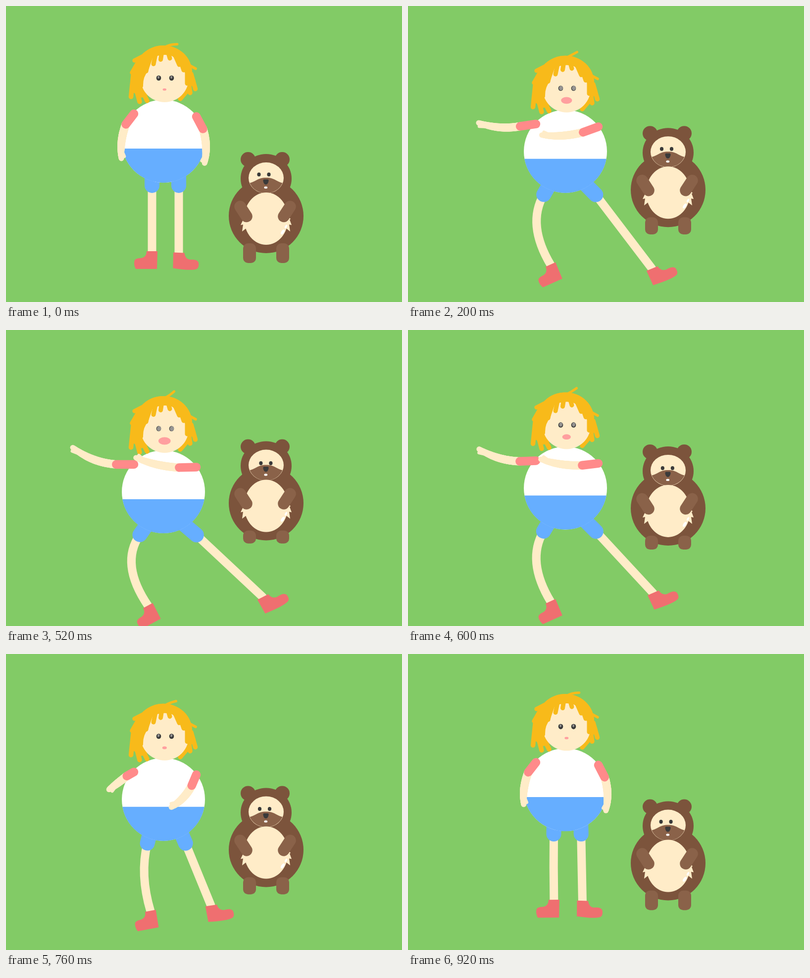
These frames come from a looping animation (800 by 600 pixels, 960 ms). An HTML page with a canvas:

```html
<!DOCTYPE html>
<html lang="en">
<head>
<meta charset="utf-8">
<title>Girl and bear dancing</title>
<style>
html, body { margin: 0; width: 100%; height: 100%; overflow: hidden; background: #82cb66; }
canvas { display: block; }
</style>
</head>
<body>
<canvas id="stage" width="800" height="600"></canvas>
<script>
const ctx = document.getElementById('stage').getContext('2d');
const LOOP = 960, STEP = 40, HALF = LOOP / 2;
const GREEN = '#82cb66', SKIN = '#ffecc8', HAIR = '#f8ba1a', BLUE = '#66aeff', SLEEVE = '#ff8a8a',
  SHOE = '#ef6f70', LIPS = '#ff9f9f', DARK = '#3a3a3a', GLINT = '#969492', FUR = '#7c543c', PAW = '#8a6249';

const mix = (a, b, k) => a + (b - a) * k;
const smooth = k => k * k * (3 - 2 * k);

function fill(color, path) {
  ctx.fillStyle = color;
  ctx.fill(new Path2D(path));
}
function ellipse(color, x, y, rx, ry = rx, turn = 0) {
  ctx.fillStyle = color;
  ctx.beginPath();
  ctx.ellipse(x, y, rx, ry, turn, 0, 7);
  ctx.fill();
}
function stroke(color, width, path, cap = 'round') {
  ctx.strokeStyle = color;
  ctx.lineWidth = width;
  ctx.lineCap = cap;
  ctx.stroke(new Path2D(path));
}
const line = (color, width, from, to) => stroke(color, width, `M${from}L${to}`);
function placed([x, y], draw, turn = 0, stretch = 1) {
  ctx.save();
  ctx.translate(x, y);
  ctx.rotate(turn * Math.PI / 180);
  ctx.scale(stretch, 1);
  draw();
  ctx.restore();
}

// Each arm swings around its shoulder; its reach shortens by "fold" on the way.
const LEFT_ARM = {
  x: 258.5, y: 218.5, side: 1, bulge: [-8, 15],
  sleeve: { length: [27, 36], fold: 14, angle: [127.5, 180] },
  hand: { length: [94, 129], fold: 46, angle: [105.7, 195.5] }
};
const RIGHT_ARM = {
  x: 384.5, y: 224, side: -1, bulge: [-9, -8],
  sleeve: { length: [28.4, 34.8], fold: 7, angle: [62, 178.5] },
  hand: { length: [96, 124], fold: 24, angle: [80, 189] }
};
function arm({ x, y, side, bulge, sleeve, hand }, swing, bend) {
  const folded = 6.75 * swing * (1 - swing) ** 2;
  const reach = ({ length, fold, angle }) => {
    const r = mix(...length, swing) - fold * folded, a = mix(...angle, bend) * Math.PI / 180;
    return [x + r * Math.cos(a), y + r * Math.sin(a)];
  };
  const [ex, ey] = reach(sleeve), [tx, ty] = reach(hand);
  const size = Math.hypot(tx - ex, ty - ey), push = side * mix(...bulge, swing) / size;
  const cx = (ex + tx) / 2 + push * (ty - ey), cy = (ey + ty) / 2 - push * (tx - ex);
  for (let p = 0; p <= 1; p += 1 / 64) {
    ellipse(SKIN, mix(mix(ex, cx, p), mix(cx, tx, p), p),
      mix(mix(ey, cy, p), mix(cy, ty, p), p), mix(8.4, 5.4, p ** 3));
  }
  const len = Math.hypot(tx - cx, ty - cy), dx = (tx - cx) / len, dy = (ty - cy) / len;
  const near = (back, out) => [tx - back * dx + out * side * dy, ty - back * dy - out * side * dx];
  line(SKIN, 6.6, near(14, 3), near(3.5, 6.3));
  line(SLEEVE, 17.5, [x, y], [ex, ey]);
}

function legs(v, drop) {
  const ankleL = [mix(295, 287, v), mix(498, 505.5, v) + drop];
  const ankleR = [mix(349, 522, v), 500 + 42.5 * v ** 1.5];
  const kneeL = [mix(295, 270, v), mix(364, 361, v) + drop];
  const kneeR = [mix(349, 385.5, v), mix(364, 361.5, v) + drop];
  stroke(SKIN, 17, `M${kneeL}Q${mix(295, 228, v)} ${mix(431, 420, v) + drop} ${ankleL}`);
  line(SKIN, 17, kneeR, ankleR);
  placed(ankleL, () =>
    fill(SHOE, 'M-11 -1H11L10 35H-33Q-38 25 -35 17Q-32 13 -22 13Q-11 11 -11 -1Z'), -29 * v);
  placed(ankleR, () =>
    fill(SHOE, 'M-11 0H11.5Q14 13 24 13Q38 11 41 18Q43 28 38 31Q28 36 -10 32Z'), mix(3, -28, v), 1 + v / 10);
  line(BLUE, 30, [mix(295, 287, v), 337 + drop], kneeL);
  line(BLUE, 30, [mix(349, 356, v), 337 + drop], kneeR);
}

function torso() {
  ellipse('#fff', 318, 274, 84);
  ctx.save();
  ctx.clip(new Path2D('M200 289H440V369H200Z'));
  ellipse(BLUE, 318, 274, 84.2);
  ctx.restore();
}

function head(hop, open) {
  stroke(HAIR, 5, `M320 84Q331 ${mix(77, 79, hop)} ${mix(346, 339.5, hop)} ${mix(77.5, 70.5, hop)}`);
  fill(HAIR, 'M260 135A58 55 0 0 1 376 135L383 152L368 172L353 180H286L274 186L252 172Q250 150 260 120Z');
  stroke(HAIR, 9.5, 'M257 140L252.5 184M261 160L270 194M273 168L285 192M374 138L382.5 168M368 150L372 176M364 174L352 188');
  stroke(HAIR, 8.5, 'M276 102L259.5 110.5M266 115L254.500 135');
  stroke(HAIR, 5.5, 'M370 120L383 127');
  ellipse(SKIN, 320.5, 147, 48.5, 48);
  fill(HAIR, 'M256 150L260 135A58 55 0 0 1 376 135L363 138L355 122L344 108L335 101L320 98L308 99L296 106L287 132Q277 143 277 160H258Z');
  stroke(HAIR, 9, 'M272.500 145V162M287 112L283 132M302 98L298 117.500M315 92L312.500 108.500M327 92L331 106M343 103L350 119M355 118L359 130M366 130V157');
  for (const x of [308.5, 334.5]) {
    ellipse(DARK, x, 146, 4.8, 5.3);
    ellipse(GLINT, x + mix(-0.4, 0.6, open), mix(144.5, 146, open), mix(1.9, 4.3, open), mix(2.7, 5, open), 0.2);
  }
  ellipse(LIPS, 320.3, mix(169.3, 171, open), mix(3.7, 12.6, open), mix(2.3, 7.7, open));
}

function bear(s) {
  for (const x of [489, 558]) ellipse(FUR, x, 311, 15);
  ellipse(FUR, 525.5, 425.5, 75.5);
  ellipse(FUR, 525.5, 350, 51.5, 50);

  ellipse(SKIN, 525.5, 348.5, 35.5, 31.5);
  ctx.save();
  ctx.clip(new Path2D('M488 360C506 356 508 348 525.5 348S545 356 563 360V390H488Z'));
  ellipse(PAW, 525.5, 348.5, 35, 31);
  ctx.restore();
  for (const x of [511, 531]) ellipse(DARK, x + 4 * s, 341.5 + 3 * s, 3.6, 4);
  fill(DARK, 'M521 351.5H529Q531 352 530.5 355Q529 362 525 362T519.5 355Q519 352 521 351.5Z');
  ellipse('#fff', 524.8, 368, 3.4, 2.2);

  ellipse(SKIN, 525.5, 431, 44.5, 53);
  fill(SKIN, 'M482 427L474 444L479 443L477 457L486 450Z');
  fill(SKIN, 'M569 424L575 432L573 433L577 444L572 443L574 457L565 450Z');
  ellipse('#fff', 559, 458, 2.8, 5.8, 0.6);
  ellipse('#fff', 565.7, 447, 2, 4, 0.5);
  stroke(PAW, 23.5, 'M473 406.5L486 426.5M574 406.5L561 426.5');
  ctx.fillStyle = PAW;
  for (const x of [479, 546]) {
    ctx.beginPath();
    ctx.roundRect(x, 481, 26, 40 - 14 * s, 10);
    ctx.fill();
  }
}

function draw(time) {
  const rising = time < HALF;
  const k = (time % HALF) / HALF;
  const s = smooth(rising ? k : 1 - k);
  const easeOut = power => rising ? 1 - (1 - k) ** power : s;
  const hop = easeOut(2.2), swing = easeOut(3.3), bend = smooth(hop ** 0.8);
  const open = rising ? swing : 1 / (1 + (k / 0.27) ** 3);
  const drop = 55 * s;

  ctx.fillStyle = GREEN;
  ctx.fillRect(0, 0, 800, 600);
  legs(swing, drop);
  placed([0, drop], () => {
    torso();
    head(hop, open);
    arm(LEFT_ARM, swing, bend);
    arm(RIGHT_ARM, swing, bend);
  });
  placed([0, -76 * hop], () => bear(s));
}

function tick() {
  draw(Math.floor(performance.now() / STEP + 0.05) * STEP % LOOP);
  requestAnimationFrame(tick);
}
tick();
</script>
</body>
</html>
```
